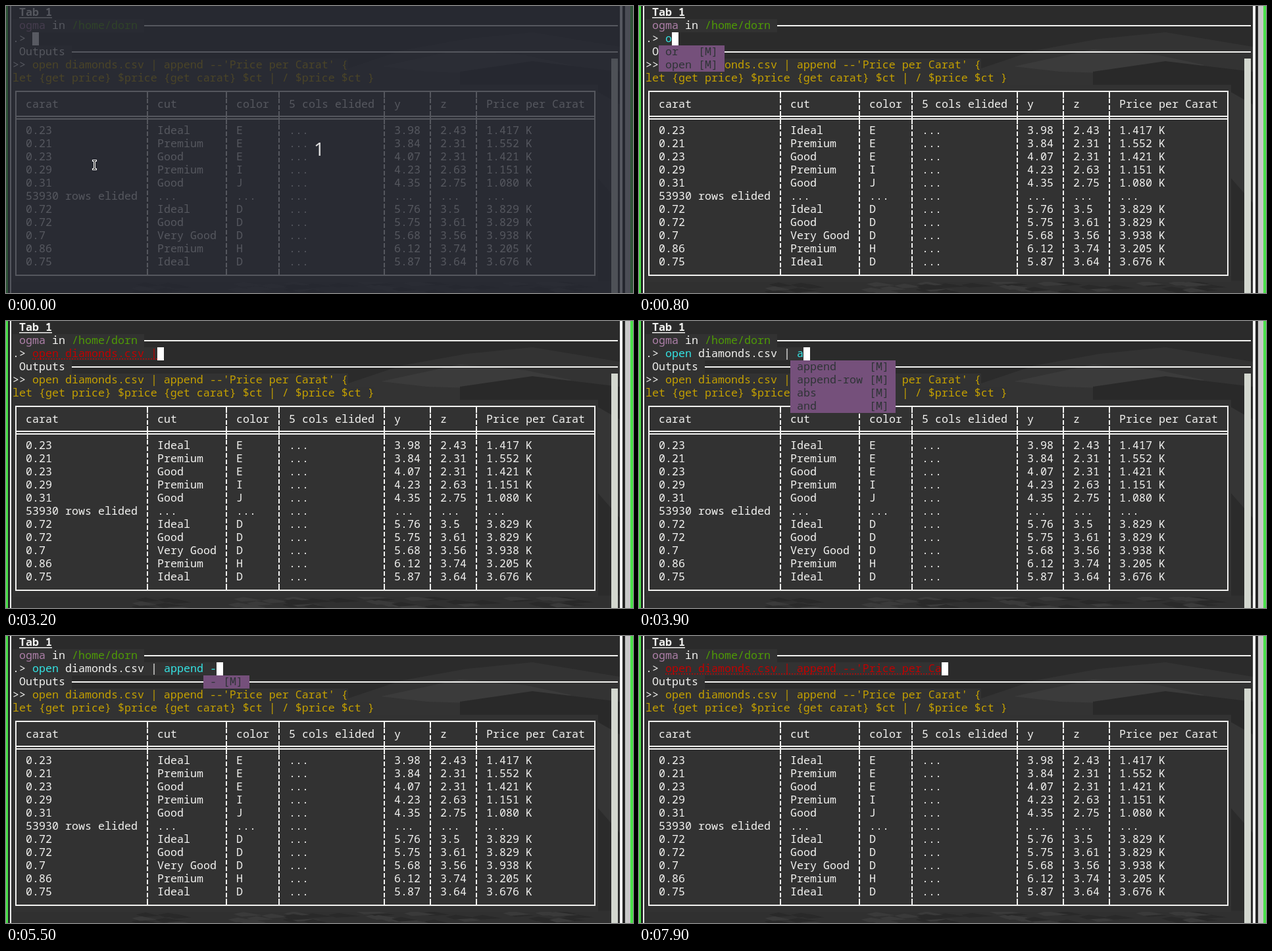
Write an HTML page with a canvas that moves like this. It is 953x437 px and loops after 8 s.

```html
<!DOCTYPE html>
<html lang="en">
<head>
<meta charset="utf-8">
<title>Terminal session</title>
<style>
  html, body { margin: 0; width: 100%; height: 100%; overflow: hidden; background: #2a2a2a; }
  canvas { display: block; }
</style>
</head>
<body>
<canvas id="stage" width="953" height="437"></canvas>
<script>
const ctx = document.getElementById('stage').getContext('2d');
const LOOP = 8000, CELL = 10, ROW = 20;
const FONT = '16.667px "Noto Sans Mono", monospace';
const C = {
  cell: '#323232', white: '#f2f2f0', cyan: '#34e2e2', red: '#c00000', gold: '#c4a000',
  green: '#4e9a06', mauve: '#ad7fa8', popup: '#75507b', ink: '#2e3436'
};

const COMMAND = "open diamonds.csv | append --'Price per Ca";
const POPUPS = {
  or: { x: 30, items: ['or   [M]', 'open [M]'] },
  open: { x: 30, items: ['open [M]'] },
  file: { x: 80, items: ['diamonds.csv [P]'] },
  all: { x: 230, items: commands('*', '+', '-', '/', '=', 'abs', 'and', 'append', 'append-row', 'benchmark') },
  a: { x: 230, items: commands('append', 'append-row', 'abs', 'and') },
  append: { x: 230, items: commands('append', 'append-row') },
  minus: { x: 300, items: ['- [M]'] }
};
// time, typed characters, popup, whether the input is invalid
const STEPS = [
  [0, 0], [400, 1], [800, 1, 'or'], [900, 2, 'open'], [1400, 3, 'open'], [1700, 5],
  [2000, 7, 'file'], [2600, 17, 'file'], [2800, 18], [3200, 19, '', true], [3400, 20, 'all', true],
  [3900, 21, 'a'], [4000, 22, 'append'], [4200, 23, 'append'], [4400, 24, 'append'],
  [4600, 26, 'append'], [4800, 27], [5500, 28, 'minus'], [5600, 29], [6100, 30, '', true],
  [6400, 31, '', true], [6700, 32, '', true], [6800, 34, '', true], [7000, 35, '', true],
  [7200, 36, '', true], [7300, 37, '', true], [7400, 39, '', true], [7500, 40, '', true],
  [7700, 41, '', true], [7900, 42, '', true]
];

const COLUMNS = [30, 230, 350, 430, 590, 660, 730];
const TABLE = [
  'carat|cut|color|5 cols elided|y|z|Price per Carat',
  '',
  '0.23|Ideal|E|...|3.98|2.43|1.417 K',
  '0.21|Premium|E|...|3.84|2.31|1.552 K',
  '0.23|Good|E|...|4.07|2.31|1.421 K',
  '0.29|Premium|I|...|4.23|2.63|1.151 K',
  '0.31|Good|J|...|4.35|2.75|1.080 K',
  '53930 rows elided|...|...|...|...|...|...',
  '0.72|Ideal|D|...|5.76|3.5|3.829 K',
  '0.72|Good|D|...|5.75|3.61|3.829 K',
  '0.7|Very Good|D|...|5.68|3.56|3.938 K',
  '0.86|Premium|H|...|6.12|3.74|3.205 K',
  '0.75|Ideal|D|...|5.87|3.64|3.676 K'
];

function commands(...names) {
  return names.map(name => name.padEnd(10) + ' [M]');
}

function rect(x, y, w, h, color) {
  ctx.fillStyle = color;
  ctx.fillRect(x, y, w, h);
}

function text(str, x, row, color, back = C.cell, font = FONT) {
  if (back) rect(x, row * ROW, str.length * CELL, ROW, back);
  ctx.font = font;
  ctx.fillStyle = color;
  ctx.fillText(str, x, row * ROW + 15);
}

function polygon(color, ...points) {
  ctx.fillStyle = color;
  ctx.beginPath();
  for (let i = 0; i < points.length; i += 2) ctx.lineTo(points[i], points[i + 1]);
  ctx.fill();
}

function drawBackdrop() {
  rect(0, 0, 953, 437, '#2b2b2b');
  polygon('#333333', 520, 95, 600, 68, 700, 50, 800, 40, 933, 62, 933, 125, 520, 125);
  polygon('#3b3b3b', 570, 92, 690, 66, 790, 75, 860, 90, 770, 104, 640, 100);
  polygon('#292929', 690, 100, 800, 84, 933, 100, 933, 150, 690, 125);
  polygon('#353535', 898, 130, 933, 150, 933, 300, 898, 260);
  rect(8, 418, 925, 19, '#303030');
  let seed = 7;
  const random = () => (seed = seed * 16807 % 2147483647) / 2147483647;
  for (let i = 0; i < 45; i++) {
    const x = 190 + random() * 700, y = 420 + random() * 16;
    polygon(i % 2 ? '#3a3a3a' : '#292929', x, y, x + 15, y - 3, x + 35 + random() * 15, y + 2, x + 12, y + 4);
  }
}

function drawTable() {
  rect(10, 120, 890, 300, C.cell);
  TABLE.forEach((line, i) => line.split('|').forEach((cell, col) =>
    text(cell, COLUMNS[col], 7 + i, C.white, null)));
  ctx.strokeStyle = C.white;
  ctx.lineWidth = 2;
  ctx.strokeRect(15, 130, 880, 280);
  rect(15, 167, 880, 2, C.white);
  rect(15, 171, 880, 2, C.white);
  for (const col of COLUMNS.slice(1)) {
    const x = col - 15;
    rect(x - 1, 130, 2, 10, C.white);
    rect(x - 1, 160, 2, 20, C.white);
    rect(x - 1, 400, 2, 10, C.white);
    for (let y = 140; y < 400; y += 10)
      if (y < 160 || y >= 180) rect(x - 1, y + 1, 2, 7, C.white);
  }
}

function drawWindow() {
  drawBackdrop();
  rect(0, 0, 3, 437, '#4be04b');
  rect(3, 0, 3, 437, '#202020');
  rect(6, 0, 2, 437, '#f0f0f0');
  rect(920, 80, 10, 357, '#d3d7cf');
  rect(933, 0, 4, 437, '#f4f4f4');
  rect(937, 0, 4, 437, '#242424');
  rect(941, 0, 8, 437, '#c8c8c8');
  rect(949, 0, 4, 437, '#4be04b');

  text('Tab 1', 20, 0, C.white, null, 'bold ' + FONT);
  rect(20, 17, 50, 1.5, C.white);
  text(' ogma ', 10, 1, C.mauve);
  text('in ', 70, 1, C.white);
  text('/home/dorn ', 100, 1, C.green);
  rect(210, 29, 720, 2, C.white);
  text(' Outputs ', 10, 3, C.white);
  rect(100, 69, 830, 2, C.white);
  text('>> ', 10, 4, C.white);
  text("open diamonds.csv | append --'Price per Carat' {", 40, 4, C.gold);
  text('let {get price} $price {get carat} $ct | / $price $ct }', 10, 5, C.gold);
  drawTable();
}

function drawInput(count, popup, invalid) {
  const typed = COMMAND.slice(0, count), end = 40 + count * CELL;
  text('.> ', 10, 2, C.white);
  if (invalid) {
    text(typed, 40, 2, C.red);
    for (let x = 40; x < end; x += 4) rect(x, 57, 2, 1.5, C.red);
  } else {
    text(typed.slice(0, 4), 40, 2, C.cyan);
    text(typed.slice(4, 20), 80, 2, C.white);
    text(typed.slice(20), 240, 2, C.cyan);
  }
  rect(end, 40, CELL, ROW, '#ffffff');
  if (popup) {
    const { x, items } = POPUPS[popup];
    items.forEach((item, i) => text(` ${item} `, x, 3 + i, C.ink, C.popup));
  }
}

function drawPointer() {
  rect(131, 234, 7, 3, '#fff');
  rect(133, 235, 3, 14, '#fff');
  rect(131, 247, 7, 3, '#fff');
  rect(132, 235, 5, 1, '#111');
  rect(134, 235, 1, 14, '#111');
  rect(132, 248, 5, 1, '#111');
}

function drawCountdown() {
  rect(0, 0, 953, 437, 'rgba(38, 41, 51, .77)');
  ctx.font = '28px "Noto Sans", sans-serif';
  ctx.fillStyle = '#dcdcdc';
  ctx.textAlign = 'center';
  ctx.fillText('1', 476, 228);
  ctx.textAlign = 'left';
}

function render(now) {
  const t = now % LOOP;
  const [, count, popup, invalid] = STEPS.findLast(step => step[0] <= t);
  drawWindow();
  drawInput(count, popup, invalid);
  if (t < 100) drawCountdown();
  if (t < 300) drawPointer();
}

function tick() {
  render(performance.now());
  requestAnimationFrame(tick);
}
tick();
</script>
</body>
</html>
```
